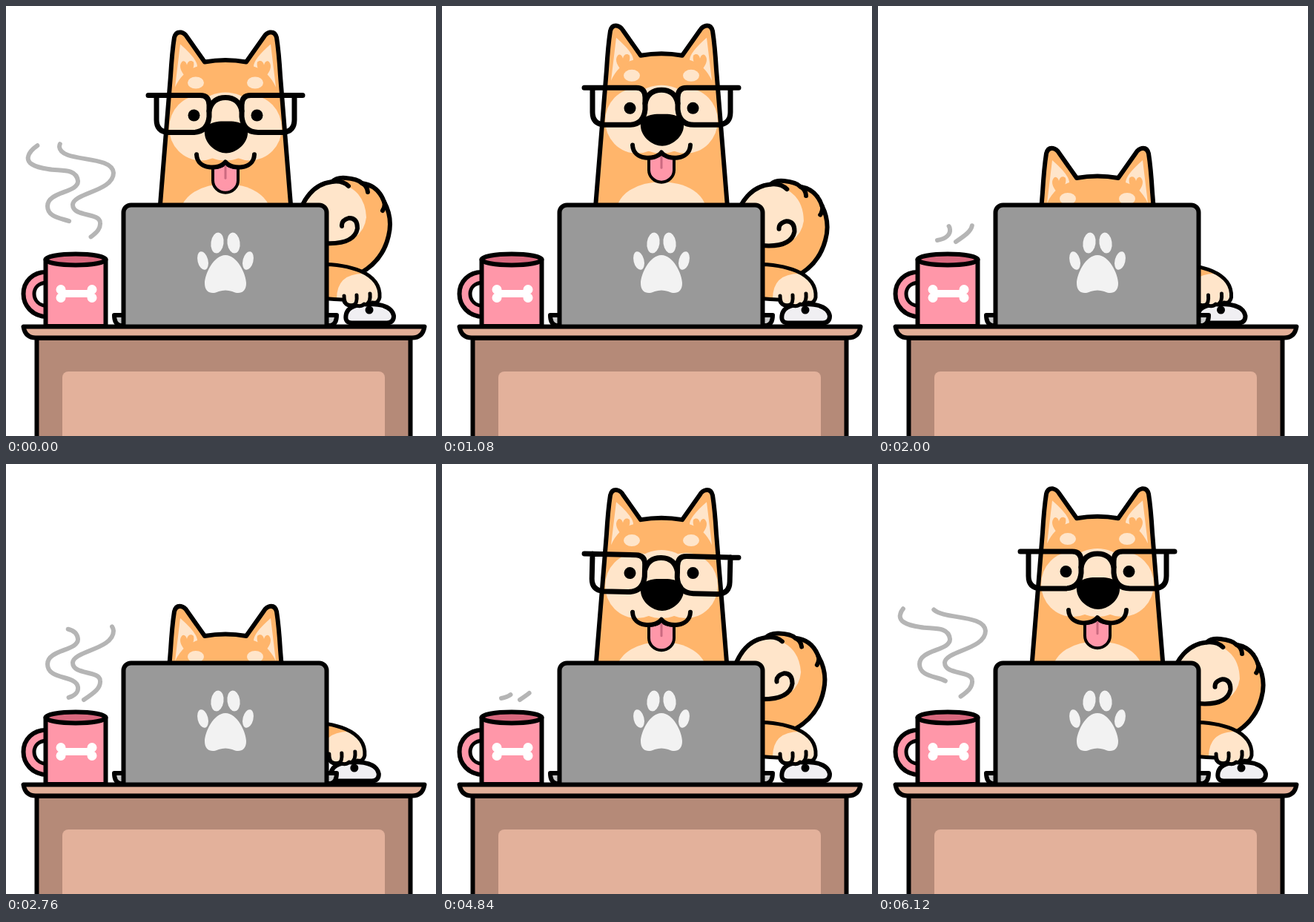
An HTML page for the animation above (6.16 s loop, 580 by 580 pixels).

```html
<!DOCTYPE html>
<html lang="en">
<head>
<meta charset="utf-8">
<title>Dog at a desk</title>
<style>
html, body { margin: 0; height: 100%; overflow: hidden; background: #fff; }
svg { display: block; width: 100vw; height: 100vh; }
.line { fill: none; stroke: #000; stroke-width: 6; stroke-linecap: round; stroke-linejoin: round; }
.orange { fill: #ffb56b; }
.cream { fill: #ffe5ca; }
.pink { fill: #ff97a9; }
.steam { fill: none; stroke: #b5b5b5; stroke-width: 6; stroke-linecap: round; }
.mirror { transform: matrix(-1, 0, 0, 1, 592, 0); }
</style>
</head>
<body>
<svg viewBox="0 0 580 580">
  <defs>
    <path id="tailShape" d="M400 268Q414 240 440 237Q446 231 458 232Q474 233 480 239Q502 242 510 264Q522 286 516 310Q508 345 475 362H420Z"/>
    <path id="armShape" d="M400 349C468 344 506 362 504 393Q502 402 494 400Q490 405 483 402Q478 407 470 403Q458 406 455 396Q445 396 400 392Z"/>
    <path id="bodyShape" d="M203 330L222 95Q224 62 227 43Q229 35 236 36Q241 37 244 42L268 76Q296 71 324 76L348 42Q351 37 356 36Q363 35 365 43Q368 62 370 95L389 330Z"/>
    <g id="ear">
      <path class="cream" d="M235 52Q258 72 258 82Q238 88 228 110Z"/>
      <path class="orange" d="M244 98C237 91 232 82 237 76C240 73 243 76 244 80C245 74 250 73 253 76C255 84 249 91 244 98Z"/>
    </g>
    <g id="cheek">
      <ellipse class="cream" cx="263" cy="165" rx="43" ry="44"/>
      <ellipse class="cream" cx="256" cy="104" rx="11" ry="8"/>
      <circle cx="253.500" cy="148" r="8"/>
    </g>
    <path id="lens" d="M192 121H262Q274 121 274 134V150Q272 171 252 171H219Q203 170 203 154V121"/>
    <path id="foot" d="M146 417H160V431H154Q146 429 146 417Z"/>
    <g id="toes">
      <ellipse cx="265.500" cy="343.500" rx="7" ry="12.500" transform="rotate(-14 265.500 343.500)"/>
      <ellipse cx="285" cy="319.500" rx="8.500" ry="14" transform="rotate(8 285 319.500)"/>
    </g>
  </defs>

  <path id="steamA" class="steam" pathLength="1" d="M80 316C92 314 98 308 97 301C95 284 56 292 56 270C56 250 98 252 97 236C95 218 72 223 57 220C36 217 28 211 30 203C32 194 40 190 47 185"/>
  <path id="steamB" class="steam" pathLength="1" d="M105 318C120 308 128 302 127 292C126 278 90 285 90 268C91 252 145 250 145 225C143 200 74 212 72 190C72 178 92 176 104 171"/>

  <g id="tail">
    <use href="#tailShape" class="orange"/>
    <path class="cream" d="M403 268Q418 240 444 238Q484 245 486 285Q482 320 434 322H403Z"/>
    <use href="#tailShape" class="line"/>
    <path class="line" d="M440 237Q454 235 462 243M480 239Q487 242 488 251M510 264Q512 270 508 276M430 320Q470 322 474 300Q474 286 463 286Q452 289 453 297"/>
  </g>

  <g id="hand">
    <path class="line" style="fill:#f0eff2" d="M466 427.500Q456 427 459 415Q463 402 490 402Q520 402 523 418Q523 427 514 427.500Z"/>
    <circle cx="490" cy="410" r="5.500"/>
    <use href="#armShape" class="orange"/>
    <path class="cream" d="M446 395Q446 360 484 361Q506 378 504 393Q502 402 494 400Q490 405 483 402Q478 407 470 403Q458 406 455 396Z"/>
    <g class="line" style="stroke-width:5">
      <use href="#armShape"/>
      <path d="M456 391Q456 402 462 404M473 390Q474 401 469 404M491 388Q492 398 487 402"/>
    </g>
  </g>

  <g id="body">
    <use href="#bodyShape" class="orange"/>
    <use href="#ear"/>
    <use href="#ear" class="mirror"/>
  </g>
  <ellipse id="chest" class="cream" cx="296" cy="278" rx="60" ry="38"/>
  <g id="face">
    <ellipse class="cream" cx="296" cy="163" rx="48" ry="46"/>
    <use href="#cheek"/>
    <use href="#cheek" class="mirror"/>
    <path d="M297 156C318 155 327 162 326 173C325 187 310 199 297 199C284 199 269 187 268 173C267 162 276 155 297 156Z"/>
  </g>
  <use id="outline" href="#bodyShape" class="line"/>
  <g id="tongue">
    <path class="line" style="fill:#ff97a9;stroke-width:4" d="M279 219V236a17 16.500 0 0 0 34 0V219Q300 219 296 213Q292 219 279 219Z"/>
    <path d="M296 216V233" stroke="#cb6a80" stroke-width="3" stroke-linecap="round"/>
  </g>
  <path id="mouth" class="line" d="M257 201C258 222 288 222 296 211C304 222 334 222 335 201"/>
  <g id="glasses" class="line" style="stroke-width:7">
    <use href="#lens"/>
    <use href="#lens" class="mirror"/>
    <path d="M274 142Q278 124 296 124Q314 124 318 142"/>
  </g>

  <g class="line">
    <use href="#foot" fill="#ccc"/>
    <use href="#foot" fill="#ccc" class="mirror"/>
    <rect x="158.500" y="268.500" width="274" height="172" rx="10" fill="#999"/>
  </g>
  <g fill="#f2f2f2">
    <path d="M296 336C312 336 324 362 324 374C324 388 313 389 305 385Q296 382 287 385C279 389 268 388 268 374C268 362 280 336 296 336Z"/>
    <use href="#toes"/>
    <use href="#toes" class="mirror"/>
  </g>

  <g class="line">
    <path d="M56 366C22 364 22 412 56 412" stroke-width="20" stroke-linecap="butt"/>
    <path d="M58 366C22 364 22 412 58 412" stroke="#ff97a9" stroke-width="9"/>
    <path class="pink" d="M53.500 342H134.500V432H53.500Z"/>
    <ellipse cx="94" cy="342" rx="40.500" ry="7.500" fill="#d9687e"/>
  </g>
  <g stroke="#fff" stroke-width="13" stroke-linecap="round">
    <path d="M74 382.500h.01M74 393.500h.01M116 382.500h.01M116 393.500h.01"/>
    <path d="M76 388H114" stroke-width="10"/>
  </g>

  <rect x="41.500" y="448" width="504" height="150" class="line" style="fill:#b58a78"/>
  <rect x="76" y="493" width="435" height="110" rx="8" fill="#e3b19b"/>
  <path class="line" style="fill:#e2af98" d="M23.500 432.500H564.500Q562 447.500 548 447.500H40Q26 447.500 23.500 432.500Z"/>
</svg>
<script>
const LOOP = 6160, STEP = 40, TAU = Math.PI * 2;
const el = id => document.getElementById(id);

// Progress from a to b, held at 0 before and at 1 after.
const part = (t, a, b) => Math.min(1, Math.max(0, (t - a) / (b - a)));
const ease = (t, a, b) => (1 - Math.cos(Math.PI * part(t, a, b))) / 2;
const fall = (t, a, b) => part(t, a, b) ** 2;
const bump = (t, a, b) => Math.sin(Math.PI * part(t, a, b));

const move = (id, x, y, extra = "") => el(id).setAttribute("transform", `translate(${x} ${y}) ${extra}`);

// The front grows along the curve, then the rear follows it and wipes it out.
function drawSteam(id, age, growTime, wipeStart) {
  const front = .05 + .95 * part(age, 0, growTime) ** 1.7;
  const rear = part(age, wipeStart, wipeStart + 1250) ** 1.65;
  const { style } = el(id);
  style.display = front - rear > .002 ? "" : "none";
  style.strokeDasharray = `${front - rear} 2`;
  style.strokeDashoffset = -rear;
}

function draw(t) {
  // Hop, drop behind the laptop, later pop up past the seat and settle.
  const rise = ease(t, 4460, 4640);
  const y = 156 * (fall(t, 1500, 1780) - rise) - 26 * bump(t, 1360, 1700) - 20 * bump(t, 4560, 4840);
  const calm = 1 - ease(t, 1320, 1440) + ease(t, 4800, 4960);
  const bob = calm * (-4.7 - 6.3 * Math.cos(TAU * (t - 390) / (LOOP / 10)));
  const follow = { body: 1, outline: 1, face: 1.1, mouth: 1.45, tongue: 1.6, chest: .3 };
  for (const id in follow) move(id, 0, y + bob * follow[id]);

  // The glasses lag behind the head and land with a small bounce.
  const lift = bump(t, 1360, 1760) + bump(t, 4540, 4800), land = bump(t, 4800, 4960);
  const glassesY = 156 * (fall(t, 1600, 1880) - rise) - 40 * lift + 5 * land + bob * 1.15;
  move("glasses", 0, glassesY, `rotate(${2 * land - 3.5 * lift} 296 121)`);

  const wag = .4 + 2.3 * Math.cos(TAU * t / (LOOP / 22) + 1.75);
  move("tail", 0, Math.max(0, y) * 1.4, `rotate(${wag} 340 345)`);

  const handX = -46 * ease(t, 1640, 2280) + 50 * ease(t, 2280, 3220)
    - 23 * ease(t, 3220, 4160) + 19 * ease(t, 4480, 4760);
  move("hand", handX, 0);

  const age = (t + LOOP - 1700) % (LOOP / 2);
  drawSteam("steamA", age, 1400, 950);
  drawSteam("steamB", age, 1500, 1200);
}

const start = performance.now();
function frame() {
  const t = (performance.now() - start) % LOOP;
  draw(Math.floor(t / STEP) * STEP);
  requestAnimationFrame(frame);
}
frame();
</script>
</body>
</html>
```
